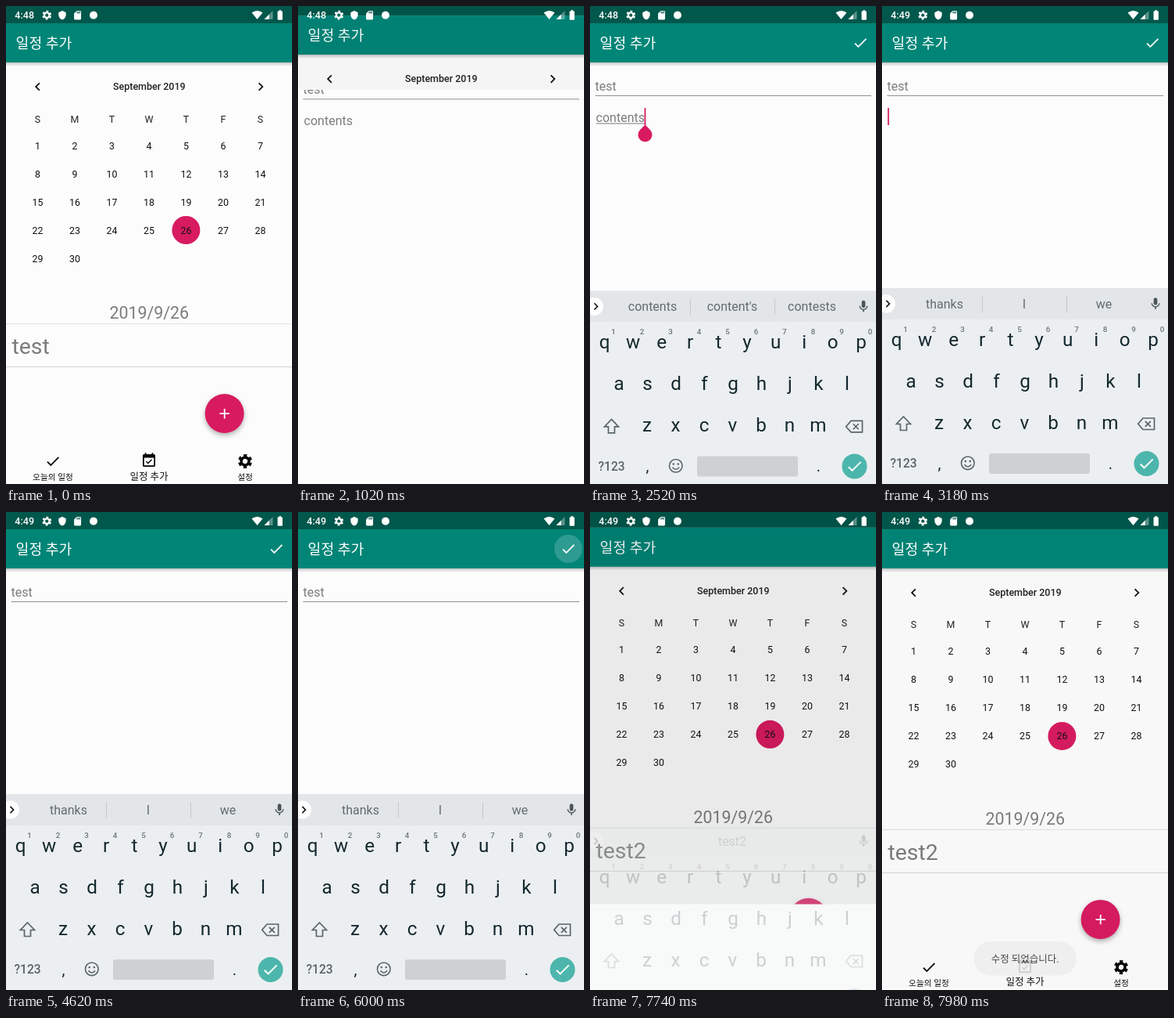
Write an HTML page that moves like this. It is 366 px wide and 610 px high and loops after 8 s.

```html
<!DOCTYPE html>
<html lang="ko">
<head>
<meta charset="utf-8">
<title>일정 추가</title>
<style>
html, body { margin: 0; width: 100%; height: 100%; overflow: hidden; background: #fcfcfc; }
svg { display: block; width: 366px; height: 610px; font-family: Roboto, "Noto Sans CJK KR", "Noto Sans CJK", sans-serif; }
text { white-space: pre; }
.mid { text-anchor: middle; }
.med { font-weight: 500; }
</style>
</head>
<body>
<svg id="stage" viewBox="0 0 366 610"></svg>
<script>
const LOOP = 8000, STEP = 60;
const PINK = '#d81b60', GREY = '#7c7c7c', INK = '#14282f', SOFT = '#59656a', BG = '#fcfcfc';

const PATHS = {
  check: 'M9 16.17 4.83 12l-1.42 1.41L9 19 21 7l-1.41-1.41z',
  left: 'M15.41 7.41 14 6l-6 6 6 6 1.41-1.41L10.83 12z',
  right: 'M10 6 8.59 7.41 13.17 12l-4.58 4.59L10 18l6-6z',
  event: 'M16.53 11.06 15.47 10l-4.88 4.88-2.12-2.12-1.06 1.06L10.59 17zM19 3h-1V1h-2v2H8V1H6v2H5c-1.1 0-2 .9-2 2v14c0 1.1.9 2 2 2h14c1.1 0 2-.9 2-2V5c0-1.1-.9-2-2-2zm0 16H5V8h14z',
  shield: 'M12 1 3 5v6c0 5.55 3.84 10.74 9 12 5.16-1.26 9-6.45 9-12V5z',
  card: 'M18 2h-8L4 8v12c0 1.1.9 2 2 2h12c1.1 0 2-.9 2-2V4c0-1.1-.9-2-2-2zm-6 6h-2V4h2zm3 0h-2V4h2zm3 0h-2V4h2z',
  battery: 'M15.67 4H14V2h-4v2H8.33C7.6 4 7 4.6 7 5.33v15.33C7 21.4 7.6 22 8.33 22h7.33c.74 0 1.34-.6 1.34-1.33V5.33C17 4.6 16.4 4 15.67 4z',
  mic: 'M12 14c1.66 0 3-1.34 3-3V5c0-1.66-1.34-3-3-3S9 3.34 9 5v6c0 1.66 1.34 3 3 3zm5.3-3c0 3-2.54 5.1-5.3 5.1S6.7 14 6.7 11H5c0 3.41 2.72 6.23 6 6.72V21h2v-3.28c3.28-.48 6-3.3 6-6.72z',
  tab: 'M11.59 7.41 15.17 11H1v2h14.17l-3.59 3.59L13 18l6-6-6-6zM20 6v12h2V6z'
};

const rect = (x, y, w, h, fill, more = '') =>
  `<rect x="${x}" y="${y}" width="${w}" height="${h}" fill="${fill}" ${more}/>`;
const circle = (x, y, r, fill, more = '') =>
  `<circle cx="${x}" cy="${y}" r="${r}" fill="${fill}" ${more}/>`;
const label = (s, x, y, size, fill, cls = 'mid', id = '') =>
  `<text x="${x}" y="${y}" font-size="${size}" fill="${fill}" class="${cls}" id="${id}">${s}</text>`;
const icon = (name, x, y, k, fill, id = '') =>
  `<path id="${id}" d="${PATHS[name]}" fill="${fill}" transform="translate(${x} ${y}) scale(${k}) translate(-12 -12)"/>`;
const line = (d, color, w) => `<path d="${d}" fill="none" stroke="${color}" stroke-width="${w}"/>`;
const gear = (x, y, k, color) =>
  `<g transform="translate(${x} ${y}) scale(${k}) rotate(14.3)" fill="none" stroke="${color}">
    <circle r="5.6" stroke-width="4"/><circle r="8.4" stroke-width="3.6" stroke-dasharray="4.6 4.196"/></g>`;
const drop = id => `<path id="${id}" d="M-9-9H0A9 9 0 1 1-9 0z" fill="${PINK}"/>`;

const header = () => rect(0, 0, 366, 610, BG) + rect(0, 72, 366, 5, 'url(#shade)') +
  rect(0, 22, 366, 50, '#008577') + rect(0, 0, 366, 22, '#00574b') +
  label('일정 추가', 12.6, 54, 18.3, '#fff', '');

function calendar() {
  const col = i => 40.4 + i * 47.5;
  let s = header() + icon('left', 40.5, 103, .89, '#111') + icon('right', 326, 103, .89, '#111') +
    label('September 2019', 183.3, 107.3, 12.5, '#222', 'mid med') +
    circle(230.4, 286, 18, PINK);
  [...'SMTWTFS'].forEach((d, i) => s += label(d, col(i), 148.5, 12.4, '#222'));
  for (let d = 1; d <= 30; d++)
    s += label(d, col((d - 1) % 7), 182.5 + Math.floor((d - 1) / 7) * 36, 12.4, '#111');
  return s + label('2019/9/26', 183.3, 399, 21.36, GREY) +
    rect(0, 405, 366, 1, '#e2e2e2') + rect(0, 460, 366, 1, '#d3d3d3') +
    label('', 7.4, 444.3, 28.48, GREY, '', 'item') +
    circle(279.6, 520, 25, PINK, 'style="filter:drop-shadow(0 3px 3px rgba(0,0,0,.3))"') +
    line('M273.5 520.2h12.4M279.7 514v12.4', '#fff', 1.8) +
    icon('check', 60, 581, .89, '#000') + icon('event', 183, 580, .89, '#000') + gear(306, 581, .89, '#000') +
    label('오늘의 일정', 60, 605, 10.7, '#111') + label('일정 추가', 183, 604.5, 12.5, '#111') +
    label('설정', 306, 605, 10.7, '#111') +
    rect(0, 0, 366, 610, '#000', 'id="dim"');
}

const editor = () => header() +
  circle(346, 47, 18, '#fff', 'id="ripple"') + icon('check', 346, 47, .89, '#fff') +
  label('', 6.6, 107.8, 16, GREY, '', 'title') + rect(7, 109.5, 36, 1, GREY, 'id="titleMark"') +
  rect(6.5, 114, 353.5, 1, '#8f8f8f', 'id="rule"') +
  rect(0, 90, 1.6, 22, PINK, 'id="titleCaret"') + drop('titleDrop') +
  label('', 7.6, 147.8, 16, GREY, '', 'body') + rect(8, 149.5, 62, 1, GREY, 'id="bodyMark"') +
  rect(0, 130, 1.8, 22, PINK, 'id="bodyCaret"') + drop('bodyDrop');

function keyboard() {
  let s = rect(0, 400, 366, 270, '#eceff1') + rect(0, 360, 366, 40, '#e2e6e9') +
    circle(5.5, 380, 11.5, '#fff') + icon('right', 7.6, 380, .78, '#111') + icon('mic', 350, 380, .78, '#4a565b') +
    `<g id="bars">${rect(128, 370, 1, 21, '#c3c9cc')}${rect(236, 370, 1, 21, '#c3c9cc')}</g>`;
  [80, 182, 284].forEach((x, i) => s += label('', x, 386, 16, '#636c70', 'mid', 'word' + i));
  [['qwertyuiop', 18.6, 434], ['asdfghjkl', 37, 486.5], ['zxcvbnm', 73, 539.5]].forEach(([keys, x, y]) =>
    [...keys].forEach((k, i) => s += label(k, x + i * 36.5, y, 24.3, INK)));
  [...'1234567890'].forEach((n, i) => s += label(n, 30 + i * 36.5, 416, 9.8, '#6b7579', 'mid med'));
  return s +
    line('M27.5 524l9 9.5h-5v8h-8v-8h-5z', SOFT, 1.7) +
    line('M334 526h14.5v14.5H334l-6.3-7.2zM336.8 529.8l7 7m0-7l-7 7', SOFT, 1.7) +
    label('?123', 27.6, 589.3, 15.6, SOFT, 'mid med') +
    label(',', 73.5, 591, 20, INK) + label('.', 292.5, 591, 20, INK) +
    circle(109.8, 583.3, 8.3, 'none', `stroke="${SOFT}" stroke-width="1.6"`) +
    circle(106.8, 581, 1.3, SOFT) + circle(112.8, 581, 1.3, SOFT) + line('M105.4 585.3q4.4 5.4 8.8 0', SOFT, 1.5) +
    rect(137, 571, 129, 26, '#cdd1d3', 'rx="3"') +
    circle(338.5, 584, 16, '#4db6ac') + icon('check', 338.5, 584, .98, '#fff', 'done') + icon('tab', 338.5, 584, .86, '#fff', 'next');
}

const system = () => label('4:48', 11.3, 16.4, 12.6, '#fff', 'med', 'clock') +
  gear(52.3, 11.7, .58, '#fff') + icon('shield', 72, 11.8, .52, '#fff') + icon('card', 91.6, 11.8, .56, '#fff') +
  circle(112, 11.8, 5, '#fff') +
  '<path d="M314.5 8.6q7-5 14 0L321.5 17z" fill="#fff"/>' +
  '<path d="M330.5 17h11V6z" fill="#fff" opacity=".35"/><path d="M330.5 17h6.2v-6.2z" fill="#fff"/>' +
  icon('battery', 350.7, 11.5, .63, '#fff');

const stage = document.getElementById('stage');
stage.innerHTML = `<defs>
  <linearGradient id="shade" x2="0" y2="1"><stop stop-opacity=".22"/><stop offset="1" stop-opacity="0"/></linearGradient>
  <clipPath id="reveal">${rect(0, 0, 366, 640, '#000', 'id="window"')}</clipPath></defs>
  ${rect(0, 0, 366, 610, BG)}
  <g id="calendar">${calendar()}</g>
  <g clip-path="url(#reveal)"><g id="editor">${editor()}</g></g>
  <g id="keyboard">${keyboard()}</g>
  <g id="toast">${rect(117.5, 548, 131.5, 43.5, '#eee', 'rx="21.7"')}${label('수정 되었습니다.', 183.2, 574.6, 12.5, '#2b2b2b')}</g>
  ${system()}`;

const el = {};
stage.querySelectorAll('[id]').forEach(n => { if (n.id) el[n.id] = n; });
const set = (id, attrs) => { for (const k in attrs) el[id].setAttribute(k, attrs[k]); };
const show = (id, on) => set(id, { visibility: on ? 'visible' : 'hidden' });
const write = (id, s) => { if (el[id].textContent !== s) el[id].textContent = s; };
const part = (t, from, len) => Math.min(1, Math.max(0, (t - from) / len));

const cubic = (a, b, c, d, u) => {
  const v = 1 - u;
  return a * v * v * v + 3 * b * v * v * u + 3 * c * v * u * u + d * u * u * u;
};
// Two joined curves: a very quick start, then a long settle.
function settle(x) {
  const [px, py] = x < 1 / 6 ? [[0, .05, .1333, .1667], [0, 0, .06, .4]] : [[.1667, .2083, .25, 1], [.4, .82, 1, 1]];
  let lo = 0, hi = 1;
  for (let i = 0; i < 20; i++) {
    const m = (lo + hi) / 2;
    if (cubic(...px, m) < x) lo = m; else hi = m;
  }
  return cubic(...py, lo);
}

const BODY = 'contents';
const bodyEnds = [0, 8.4, 17.5, 26.3, 31.5, 40, 48.8, 54, 62.3];

function words(t, left) {
  if (t >= 6600) return ['', 'test2', ''];
  if (t >= 6480) return ['test', 'tests', 'testing'];
  if (left === 8) return ['contents', "content's", 'contests'];
  if (left === 0) return ['thanks', 'I', 'we'];
  return [BODY.slice(0, left), left > 3 ? 'content' : 'could', left > 3 ? 'contests' : 'connection'];
}

function ripple(t, start, release, end) {
  const grow = 1 - (1 - part(t, start, 225)) ** 2;
  return { r: 18 * grow, opacity: .18 * part(t, start, 60) * (1 - part(t, release, end - release)) };
}

function draw(t) {
  const opening = t < 4000;
  const raw = opening ? part(t, 900, 420) : 1 - part(t, 7620, 425);
  const open = opening ? settle(raw) : 1 - settle(1 - raw);
  const top = 610 * (1 - open);
  set('window', { y: top, height: 640 });
  set('editor', { transform: `translate(0 ${25 * (1 - open)})` });
  set('calendar', { transform: `translate(0 ${(-12 * open).toFixed(2)})` });
  set('dim', { opacity: .1 * raw });
  show('editor', open > 0);

  const left = t < 2760 ? 8 : Math.max(0, 7 - Math.floor((t - 2760) / STEP));
  const focused = t >= 6240, typed = t >= 6540;
  write('item', t > 7620 ? 'test2' : 'test');
  write('title', typed ? 'test2' : 'test');
  write('body', BODY.slice(0, left));
  write('clock', t < 3000 ? '4:48' : '4:49');

  const bodyX = 7.8 + bodyEnds[left];
  const blink = t < 3180 || Math.floor((t - 3180) / 480) % 2 === 0;
  show('bodyCaret', open > 0 && t >= 2220 && !focused && blink);
  set('bodyCaret', { x: bodyX - .5 });
  show('bodyDrop', t >= 2220 && t < 2760);
  set('bodyDrop', { transform: 'translate(70.5 164.3) rotate(45)' });
  show('bodyMark', t >= 2340 && left > 0);
  set('bodyMark', { width: bodyEnds[left] });

  show('titleCaret', focused && (t < 7020 || t >= 7500));
  set('titleCaret', { x: typed ? 42.2 : 33.4 });
  show('titleDrop', focused && !typed);
  set('titleDrop', { transform: 'translate(34.2 124.3) rotate(45)' });
  show('titleMark', t >= 6480);
  set('titleMark', { width: typed ? 36 : 27 });
  set('rule', focused ? { fill: PINK, y: 113.7, height: 1.7 } : { fill: '#8f8f8f', y: 114, height: 1 });
  set('ripple', t < 7000 ? ripple(t, 5730, 6000, 6320) : ripple(t, 7290, 7440, 7640));

  const rise = 50 * (1 - part(t, 2260, 320)) ** 1.6;
  const fall = part(t, 7620, 150);
  set('keyboard', {
    transform: `translate(0 ${(rise + 50 * fall).toFixed(2)})`,
    opacity: part(t, 2240, 160) * (1 - fall)
  });
  const list = words(t, left);
  list.forEach((w, i) => write('word' + i, w));
  show('bars', list[0] !== '');
  show('done', t < 6420);
  show('next', t >= 6420);
  set('toast', { opacity: part(t, 7740, 280) });
}

const begin = performance.now();
function tick() {
  const t = (performance.now() - begin) % LOOP;
  draw(Math.floor(t / STEP) * STEP);
  requestAnimationFrame(tick);
}
tick();
</script>
</body>
</html>
```
